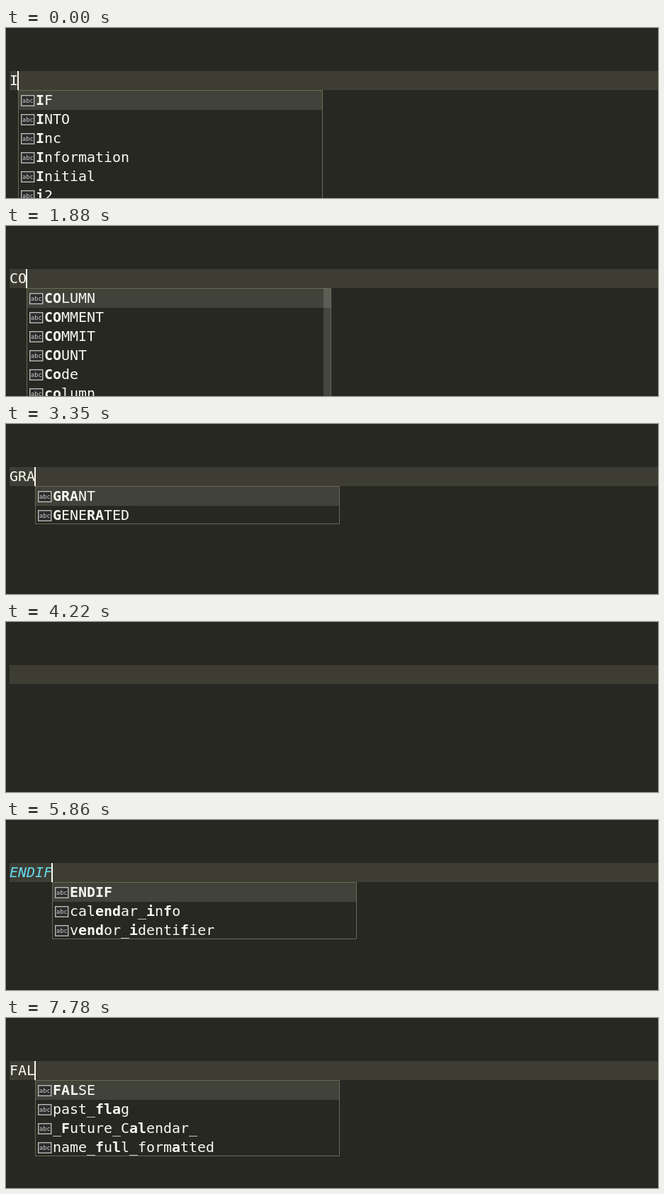
Write an HTML page that moves like this. It is 920 px wide and 241 px high and loops after 8000 ms.

```html
<!DOCTYPE html>
<html lang="en">
<head>
<meta charset="utf-8">
<title>Keyword completion</title>
<style>
html, body { margin: 0; width: 100%; height: 100%; overflow: hidden; background: #272822; }
svg { display: block; }
text { font: 20px "DejaVu Sans Mono", monospace; letter-spacing: -.041px; fill: #f8f8f2; white-space: pre; }
.hit { font-weight: bold; }
.storage { fill: #66d9ef; font-style: italic; }
.command { fill: #a6e22e; }
.constant { fill: #ae81ff; }
.icon { fill: #2b2b2c; stroke: #b9b9b5; stroke-width: 1.4; }
.abc { font-size: 8.6px; letter-spacing: 0; fill: #d2d2ce; text-anchor: middle; }
.edge { fill: none; stroke: #6b6852; }
</style>
</head>
<body>
<svg id="stage" width="920" height="241" viewBox="0 0 920 241">
  <rect width="920" height="241" fill="#272822"/>
  <rect x="5" y="61" width="915" height="27" fill="#3d3d33"/>
  <g id="view"></g>
</svg>
<script>
const LOOP = 8000, CHAR = 12, ROW = 27, TOP = 88, LEFT = 5, WIDTH = 430;
const view = document.getElementById('view');

const END_WORDS = 'END ENDCASE ENDIF ENDMACRO ENDWHILE ';
const E_WORDS = 'ELSE END ENDCASE ENDIF ENDMACRO ENDWHILE';
const T_WORDS = 'TRUE Tables Technology This the time';

// start, typed text, suggestions, scroll thumb height, token class
const states = [
  [0, 'I', 'IF INTO Inc Information Initial i2'],
  [160, 'IF', 'IF Information ENDIF identifier', 0, 'storage'],
  [620, ''],
  [860, 'E', E_WORDS, 180],
  [1010, 'EN', END_WORDS + 'ENTRIES', 135],
  [1090, 'END', END_WORDS + 'end', 180, 'storage'],
  [1560, ''],
  [1880, 'CO', 'COLUMN COMMENT COMMIT COUNT Code column', 180],
  [2110, 'COM', 'COMMENT COMMIT Common column_name'],
  [2190, 'COMM', 'COMMIT COMMENT'],
  [2340, 'COMMI', 'COMMIT'],
  [2420, 'COMMIT', 'COMMIT', 0, 'command'],
  [2970, ''],
  [3050, 'G', 'GENERATED GRANT GROUP General get group'],
  [3200, 'GR'],
  [3280, 'GR', 'GRANT GROUP group GENERATED General'],
  [3350, 'GRA', 'GRANT GENERATED'],
  [3430, 'GRAN'],
  [3520, 'GRAN', 'GRANT'],
  [3670, 'GRANT', 'GRANT', 0, 'command'],
  [4070, ''],
  [4220, '', '', 0, 'blink'],
  [4760, 'E'],
  [4840, 'E', E_WORDS, 180],
  [5140, 'EN', END_WORDS + 'ENTRIES', 135],
  [5460, 'END', END_WORDS + 'end', 180, 'storage'],
  [5780, 'ENDI', 'ENDIF calendar_info vendor_identifier'],
  [5860, 'ENDIF', 'ENDIF calendar_info vendor_identifier', 0, 'storage'],
  [6240, '', '', 0, 'blink'],
  [6760, 'T'],
  [6850, 'T', T_WORDS, 180],
  [6930, 'TR'],
  [7010, 'TR', 'TRUE Tracking entries string attribute structure'],
  [7090, 'TRU', 'TRUE structure'],
  [7160, 'TRUE', 'TRUE structure', 0, 'constant'],
  [7480, ''],
  [7560, 'F', 'FALSE FROM Facility First flag for', 180],
  [7630, 'FA', 'FALSE Facility flag format formatted past_flag', 180],
  [7780, 'FAL', 'FALSE past_flag _Future_Calendar_ name_full_formatted']
];

const rect = (x, y, w, h, attrs) =>
  `<rect x="${x}" y="${y}" width="${w}" height="${h}" ${attrs}/>`;
const text = (x, y, body, cls = '') =>
  `<text x="${x}" y="${y}" class="${cls}">${body}</text>`;

// Positions of the query letters in order, or null when one is missing.
function findLetters(word, query) {
  const found = [];
  let from = 0;
  for (const c of query.toLowerCase()) {
    const at = word.toLowerCase().indexOf(c, from);
    if (at < 0) return null;
    found.push(at);
    from = at + 1;
  }
  return found;
}

// Fuzzy match that also accepts the last two letters swapped.
function markHits(word, query) {
  const swapped = query.slice(0, -2) + [...query.slice(-2)].reverse().join('');
  const hits = findLetters(word, query) || findLetters(word, swapped) || [];
  return [...word].map((c, i) =>
    hits.includes(i) ? `<tspan class="hit">${c}</tspan>` : c).join('');
}

function popup(query, words, thumb) {
  const x = LEFT + query.length * CHAR;
  const height = words.length * ROW;
  const rows = words.map((word, i) => {
    const y = TOP + i * ROW;
    return rect(x + 4.7, y + 7.7, 18, 14.6, 'class="icon"') +
      text(x + 13.8, y + 17.5, 'abc', 'abc') +
      text(x + 25, y + 21, markHits(word, query));
  }).join('');
  return rect(x, TOP, WIDTH, height, 'fill="#272822"') +
    rect(x, TOP + 1, WIDTH, Math.min(ROW, height - 1), 'fill="#414239"') +
    rows +
    rect(x + .5, TOP + .5, WIDTH - 1, height - 1 + (words.length > 5 ? 40 : 0), 'class="edge"') +
    (thumb ? rect(x + WIDTH - 11, TOP + 1, 10, thumb - 1, 'fill="#fff" fill-opacity=".14"') : '');
}

function draw([, typed, words = '', thumb = 0, cls = '']) {
  const caret = Math.max(LEFT, LEFT - 1 + typed.length * CHAR);
  view.innerHTML = text(LEFT, 81, typed, cls) +
    (words ? popup(typed, words.split(' '), thumb) : '') +
    (cls === 'blink' ? '' : rect(caret, 61, 2, 27, 'fill="#f8f8f0"'));
}

let shown;
const start = performance.now();
function tick() {
  const t = (performance.now() - start) % LOOP;
  const state = states.findLast(s => s[0] <= t) || states[0];
  if (state !== shown) draw(shown = state);
  requestAnimationFrame(tick);
}
tick();
</script>
</body>
</html>
```
